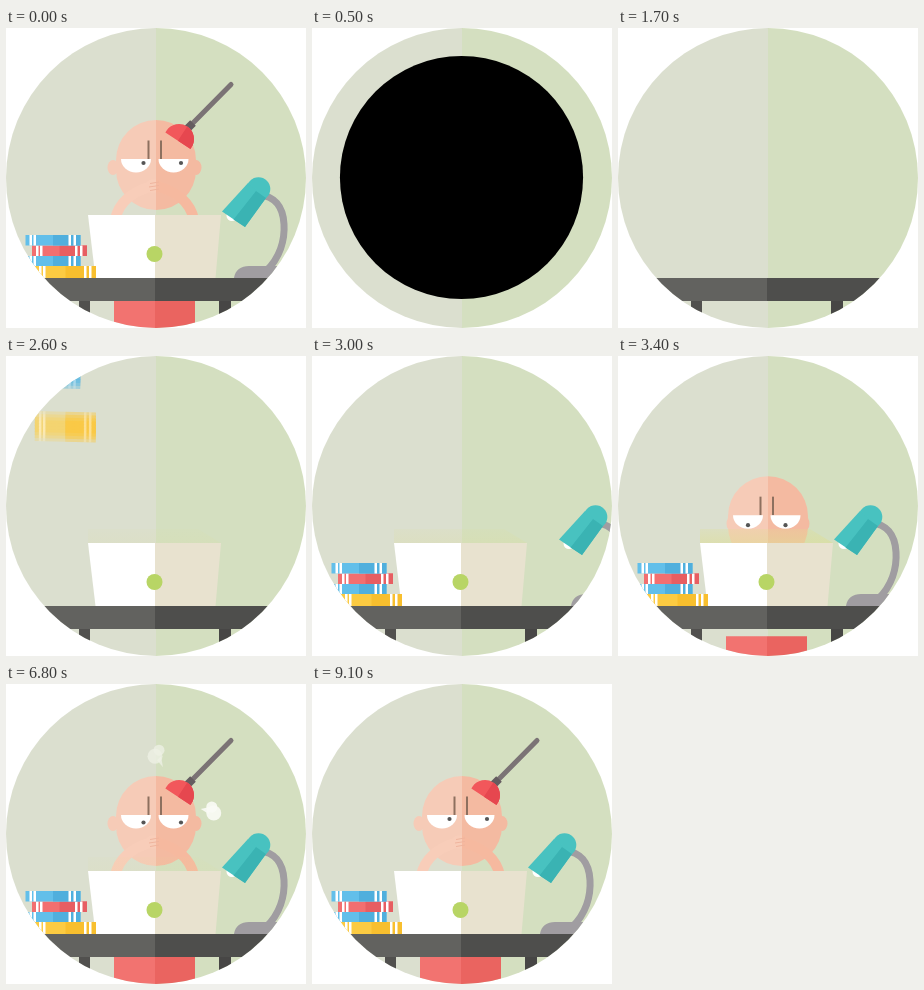
These frames come from a looping animation (300x300 px, 9200 ms). An HTML page with a canvas:

```html
<!DOCTYPE html>
<html lang="en">
<head>
<meta charset="utf-8">
<title>Desk scene</title>
<style>
html, body { margin: 0; width: 100%; height: 100%; overflow: hidden; background: #fff; }
canvas { display: block; width: 100vw; height: 100vh; }
</style>
</head>
<body>
<canvas id="stage" width="300" height="300"></canvas>
<script>
const ctx = document.getElementById('stage').getContext('2d');
const LOOP = 9200, STEP = 100;

const progress = (t, start, end) => Math.min(1, Math.max(0, (t - start) / (end - start)));
const easeOut = (p, power = 3) => 1 - (1 - p) ** power;
const backOut = p => 1 + 2.7 * (p - 1) ** 3 + 1.7 * (p - 1) ** 2;

// Hard two-tone fill: light on the left of x, shaded on the right.
function tone(left, right, x = 149) {
  const g = ctx.createLinearGradient(0, 0, 300, 0);
  g.addColorStop(0, left);
  g.addColorStop(x / 300, left);
  g.addColorStop(x / 300, right);
  g.addColorStop(1, right);
  return g;
}

function fill(color, d) {
  ctx.fillStyle = color;
  ctx.fill(new Path2D(d));
}

function stroke(color, width, d, cap = 'butt') {
  ctx.strokeStyle = color;
  ctx.lineWidth = width;
  ctx.lineCap = cap;
  ctx.stroke(new Path2D(d));
}

function rect(color, x, y, w, h) {
  ctx.fillStyle = color;
  ctx.fillRect(x, y, w, h);
}

function disc(color, x, y, rx, ry = rx) {
  ctx.fillStyle = color;
  ctx.beginPath();
  ctx.ellipse(x, y, rx, ry, 0, 0, 7);
  ctx.fill();
}

function at(x, y, draw, alpha = 1) {
  ctx.save();
  ctx.translate(x, y);
  ctx.globalAlpha *= alpha;
  draw();
  ctx.restore();
}

const skin = () => tone('#f6cbb7', '#f4baa1', 150);

function drawShirt(t) {
  const p = progress(t, 3200, 3600);
  if (p > 0) rect(tone('#f27370', '#ea6460'), 108, 273 + 29 * (1 - p) ** 2, 81, 30);
}

function drawHead(t) {
  const p = progress(t, 3200, 3800);
  if (!p) return;
  at(0, 95 * (1 - p) ** 3, () => {
    const ears = easeOut(progress(t, 3500, 3900));
    disc('#f6cbb7', 114 - 7 * ears, 139.5, 5.5, 7.5);
    disc('#f4baa1', 186 + 4 * ears, 139.5, 5.5, 7.5);
    ctx.fillStyle = skin();
    ctx.beginPath();
    ctx.roundRect(110, 92, 80, 90, 40);
    ctx.fill();
    rect('#8d705f', 141.5, 112.5, 2, 18.5);
    rect('#8d705f', 154, 112.5, 2, 18.5);

    const look = easeOut(progress(t, 6300, 6700), 2);
    const lift = progress(t, 6300, 7500);
    for (const x of [130, 167.5]) {
      fill('#fff', `M${x - 15} 131h30a15 13.5 0 0 1-30 0z`);
      disc('#555', x + 7.5 * look, 141 - 6 * lift, 2.1);
    }
  });
}

function drawArms(t) {
  const p = progress(t, 4300, 4900);
  if (!p) return;
  at(0, 42 * (1 - easeOut(p)), () => {
    stroke(tone('#f8cdb9', '#f6b99f', 150), 10.5,
      'M109 192C113 172 128 163 147 158M188 192C184 172 169 163 150 158', 'round');
    ctx.fillStyle = tone('#f8cdb9', '#f6b99f', 150);
    ctx.beginPath();
    ctx.roundRect(140, 151.5, 16, 13, 6);
    ctx.fill();
    stroke('#efb49d', 1, 'M144 155.5l9-1.5M143 159l10-1.5M144 162.5l9-1.5');
  });
}

function drawGlow(t) {
  const alpha = 0.12 * progress(t, 2200, 2500) + 0.38 * progress(t, 2900, 3300)
    - 0.15 * progress(t, 3600, 5100) - 0.25 * progress(t, 5300, 6700)
    - 0.1 * progress(t, 6800, 8600);
  if (alpha <= 0) return;
  const g = ctx.createLinearGradient(0, 172, 0, 187);
  g.addColorStop(0, 'rgba(222,222,145,.45)');
  g.addColorStop(1, 'rgba(222,222,145,1)');
  at(0, 0, () => fill(g, 'M82 173H192L215 187H82z'), alpha);
}

function drawLaptop(t) {
  const p = progress(t, 1700, 2200);
  if (!p) return;
  ctx.save();
  ctx.translate(0, 250);
  ctx.scale(1, backOut(p));
  ctx.translate(0, -250);
  fill(tone('#fff', '#e8e2cf'), 'M82 187H215L209.5 250H89.5z');
  disc('#b8d565', 148.5, 226, 8);
  ctx.restore();
}

function drawDesk(t) {
  const p = easeOut(progress(t, 1200, 1700));
  if (!p) return;
  const legs = 40 * progress(t, 1500, 1900);
  rect('#51504e', 73, 272, 11, legs);
  rect('#474645', 213, 272, 12, legs);
  rect(tone('#62625f', '#4e4e4c'), 149 - 130 * p, 250, 260 * p, 23);
}

// Bottom book first; each one falls slightly later than the one below.
const books = [
  { x: 29, y: 238, w: 61, h: 12, color: '#fccb42', shade: '#f8bf2e' },
  { x: 19.5, y: 228, w: 55, h: 10, color: '#62bfea', shade: '#50afdd' },
  { x: 26, y: 217.5, w: 55, h: 10.5, color: '#f26f70', shade: '#e75e62' },
  { x: 19.5, y: 207, w: 55, h: 10.5, color: '#62bfea', shade: '#50afdd' }
];

function drawBook({ x, y, w, h, color, shade }) {
  rect(color, x, y, w, h);
  rect(shade, x + w / 2, y, w / 2, h);
  for (const offset of [4, 8, w - 12, w - 7]) rect('#fff', x + offset, y, 2.5, h);
}

function drawBooks(t) {
  books.forEach((book, i) => {
    const p = progress(t, 2340 + 32 * i, 2740 + 60 * i);
    if (!p) return;
    const drop = -300 * (1 - p * p);
    if (p === 1) return drawBook(book);
    for (let k = -3; k <= 3; k++) {
      at(book.x + book.w / 2, book.y + drop + k * 3, () => {
        ctx.rotate(0.06 * (1 - p));
        drawBook({ ...book, x: -book.w / 2, y: 0 });
      }, 0.24);
    }
  });
}

function drawLamp(t) {
  const p = progress(t, 2700, 3400);
  if (!p) return;
  at(95 * (1 - p) ** 2, 0, () => {
    fill('#a09da1', 'M228 250C229 242 235 238 243 238H272V250z');
    stroke('#a09da1', 7, 'M260 243C274 230 279 212 278 196C277 178 268 168 253 167');
    disc('#fff', 226, 187.5, 5.5);
    disc('#48c2c0', 252.5, 161, 11.8);
    fill('#48c2c0', 'M216 183.5L242 155L260 170L239 199z');
    fill('#3ab3b3', 'M227.5 191.5L250 163L260 170L239 199z');
  });
}

function drawPlunger(t) {
  const shown = progress(t, 5700, 6100);
  if (!shown) return;
  const away = 1 - progress(t, 6200, 6400) ** 2;
  at(28 * away, -27 * away, () => {
    stroke('#7b7375', 5, 'M184 98L225 56.5', 'round');
    stroke('#655d60', 8, 'M181 101L187 95');
    ctx.translate(173, 111);
    ctx.rotate(0.58);
    fill('#f2575b', 'M-15 2V0A15 15 0 0 1 15 0V2z');
    fill('#e6474f', 'M0 2V-15A15 15 0 0 1 15 0V2z');
  }, shown);
}

function drawPuffs(t) {
  if (t < 6400 || t > 8000) return;
  const p = progress(t, 6300, 7800);
  const drift = easeOut(p, 2);
  const fade = 1 - progress(t, 6700, 7800);
  at(149, 95 - 41 * drift, () => {
    disc('#eef1e6', 0, 0, 7.5);
    disc('#eef1e6', 4, -6, 5.5);
    fill('#eef1e6', 'M2 4L8 11L6 0z');
  }, 0.85 * fade);
  at(195 + 23 * drift, 129, () => {
    disc('#fafbf6', 0, 0, 7.5);
    disc('#fafbf6', -2, -6, 5.5);
    fill('#fafbf6', 'M-4 -6L-13 -4L-5 1z');
  }, fade);
}

function render(time) {
  let t = Math.floor((time % LOOP) / STEP) * STEP;
  if (t < 100) t = LOOP - STEP;

  rect('#fff', 0, 0, 300, 300);
  ctx.save();
  ctx.beginPath();
  ctx.arc(150, 150, 150, 0, 7);
  ctx.clip();
  rect(tone('#dbdfcf', '#d4dfc0', 150), 0, 0, 300, 300);

  const hole = 150 * (1 - progress(t, 300, 1100) ** 1.2);
  if (hole > 0) disc('#000', 149.5, 149.5, hole > 149 ? 152 : hole);

  drawShirt(t);
  drawHead(t);
  drawArms(t);
  drawGlow(t);
  drawDesk(t);
  drawLaptop(t);
  drawBooks(t);
  drawLamp(t);
  drawPuffs(t);
  drawPlunger(t);
  ctx.restore();
}

const start = performance.now();
function tick() {
  render(performance.now() - start);
  requestAnimationFrame(tick);
}
tick();
</script>
</body>
</html>
```
